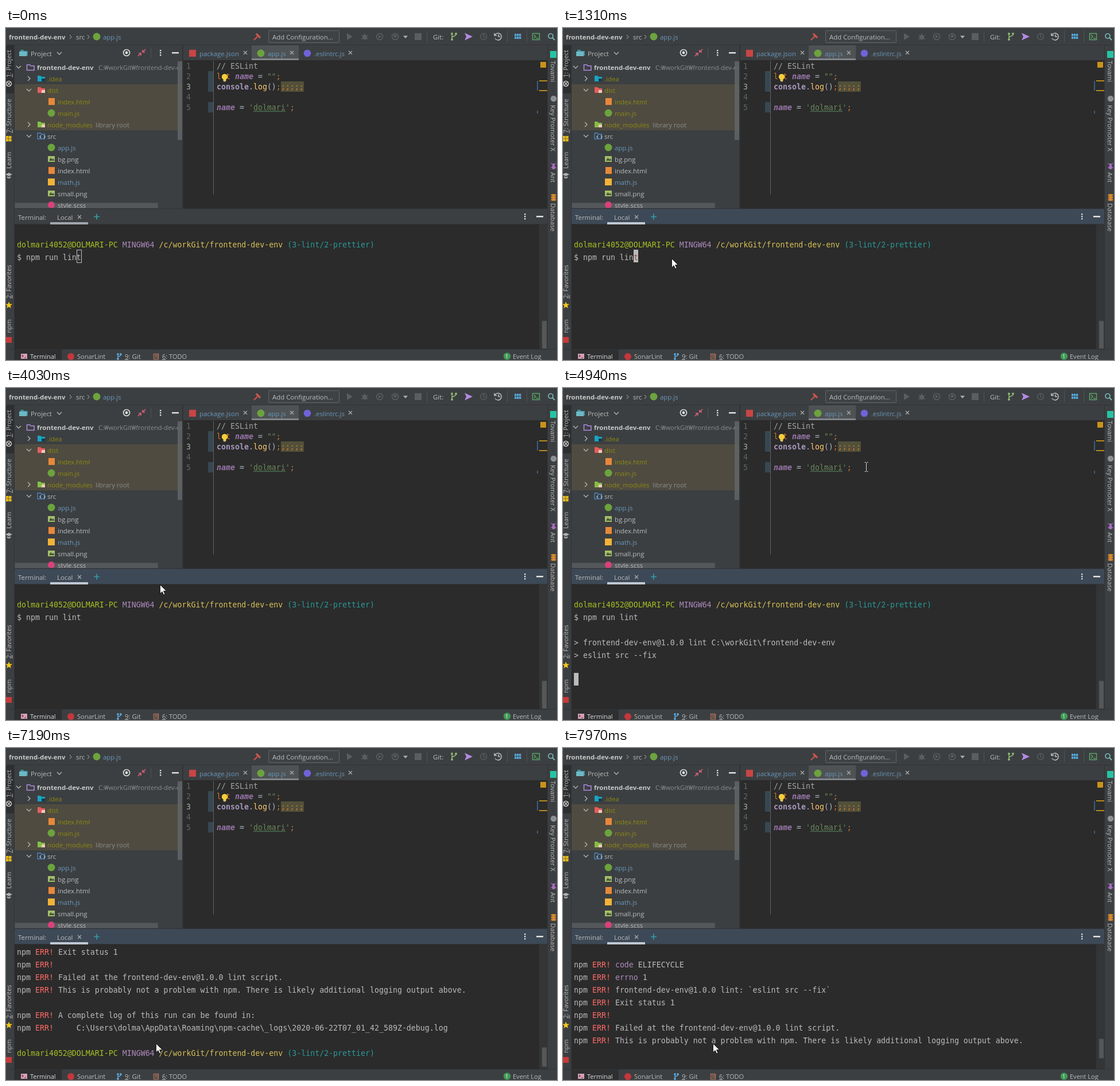
An HTML page for the animation above (8 s loop, 960 by 578 pixels).

```html
<!DOCTYPE html>
<html lang="en">
<head>
<meta charset="utf-8">
<title>Terminal lint run</title>
<style>
html, body { margin: 0; width: 100%; height: 100%; overflow: hidden; background: #3c3f41; }
svg { display: block; width: 100vw; height: 100vh; }
text { font: 11.4px "Open Sans", "Noto Sans", sans-serif; white-space: pre; }
text.mono { font: 13.289px "DejaVu Sans Mono", "Noto Sans Mono", monospace; font-variant-ligatures: none; }
.bold { font-weight: bold !important; }
.global { font-weight: bold; font-style: italic; }
</style>
</head>
<body>
<svg id="stage" viewBox="0 0 960 578"></svg>
<script>
const stage = document.getElementById('stage');
const USER = 'dolmari';
const TEXT = '#bbbbbb', BLUE = '#6897bb', OLIVE = '#8c8a12', GREY = '#8a8c8d';
const ICON = '#afb1b3', DIM = '#5b5e60', PANEL = '#3c3f41', DARK = '#2b2b2b', EDGE = '#313335';

let layer = stage;
function el(tag, attrs, content) {
  const node = document.createElementNS('http://www.w3.org/2000/svg', tag);
  for (const key in attrs) node.setAttribute(key, attrs[key]);
  if (content) node.textContent = content;
  return layer.appendChild(node);
}
function group(draw, attrs = {}) {
  const parent = layer;
  const node = layer = el('g', attrs);
  draw();
  layer = parent;
  return node;
}
const rect = (x, y, width, height, fill, more) => el('rect', { x, y, width, height, fill, ...more });
const dot = (cx, cy, r, fill, more) => el('circle', { cx, cy, r, fill, ...more });
const ring = (cx, cy, r, stroke, w = 1.3) => dot(cx, cy, r, 'none', { stroke, 'stroke-width': w });
const line = (d, stroke, w = 1.3) => el('path', { d, stroke, fill: 'none', 'stroke-width': w });
const shape = (d, fill) => el('path', { d, fill });
const label = (x, y, str, fill = TEXT, more) => el('text', { x, y, fill, ...more }, str);
const cross = (x, y) => line(`M${x - 3} ${y - 3}l6 6m0-6l-6 6`, ICON, 1.1);
const chevron = (x, y, open) =>
  line(open ? `M${x - 4} ${y - 2}l4 4 4-4` : `M${x - 2} ${y - 4}l4 4-4 4`, ICON, 1.4);
const dots = (x, y) => [-4, 0, 4].forEach(d => rect(x - 1, y + d - 1, 2.4, 2.4, '#dcdcdc'));
const folder = (x, y, fill) => shape(`M${x} ${y - 5}h5l2 2h6v8h-13z`, fill);

// Spans are [text, colour, class]
function mono(x, y, spans) {
  const node = el('text', { x, y, class: 'mono' });
  for (const [str, fill, cls] of spans) {
    const span = document.createElementNS(node.namespaceURI, 'tspan');
    span.textContent = str;
    span.setAttribute('fill', fill || TEXT);
    if (cls) span.setAttribute('class', cls);
    node.append(span);
  }
}

function drawToolbar() {
  rect(0, 0, 960, 578, PANEL);
  label(5, 19.5, 'frontend-dev-env', '#c8c8c8', { class: 'bold' });
  line('M111 12l3 3.500-3 3.500M142 12l3 3.500-3 3.500', ICON, 1);
  label(122, 19.5, 'src');
  dot(158, 15, 6.5, '#6ca33e');
  label(169, 19.5, 'app.js', BLUE);

  line('M432 21l8-8', '#c75450', 2.2);
  line('M436 10l7 7', '#c75450', 3.5);
  rect(457.5, 4.5, 123, 21, '#3f4244', { stroke: '#646769', rx: 2 });
  label(464, 20, 'Add Configuration...');
  shape('M594 9l10 6-10 6z', DIM);
  dot(625, 16, 4.3, DIM);
  line('M619 12l12 8m0-8l-12 8M625 9v3', DIM);
  ring(651, 15, 5.5, DIM, 1.6);
  shape('M649 12l5 3-5 3z', DIM);
  ring(678, 15, 5.5, DIM, 1.6);
  dot(678, 14, 2.5, DIM);
  shape('M692 13.500h8l-4 4.500z', ICON);
  rect(712, 9, 12, 12, DIM);
  [733, 873, 907].forEach(x => rect(x, 5, 1, 20, '#515456'));
  label(744, 19.5, 'Git:');
  line('M777 11v9M784 11c0 4-7 2-7 7', '#8fb573', 1.5);
  [[777, 10], [784, 10], [777, 20]].forEach(([x, y]) => dot(x, y, 2, '#8fb573'));
  shape('M799 8.500l14 6.500-14 6.500 3-6.500z', '#b389e0');
  ring(832, 15, 5.5, DIM);
  line('M832 11v4l3 2', DIM);
  line('M852 12a6 6 0 1 1 0 6M851 9v4h4M858 11v4h3', '#c5c5c5', 1.4);
  for (let i = 0; i < 6; i++) rect(886 + i % 3 * 4, 10 + (i / 3 | 0) * 5, 3.3, 4, '#55a6d9');
  rect(917.5, 9.5, 12, 11, 'none', { stroke: '#59a869', 'stroke-width': 1.4 });
  line('M920 12l3 3-3 3M924 18h4', '#59a869');
  ring(949, 14, 4, '#76b9bf', 1.7);
  line('M952 17l4 4', '#76b9bf', 2);
  rect(0, 29, 960, 1, EDGE);
}

function drawSideBars() {
  rect(0, 30, 14, 84, '#2d2f30');
  rect(14, 30, 1, 548, EDGE);
  rect(943, 30, 1, 530, EDGE);
  const left = [['1: Project', 86, 1], ['7: Structure', 183, 1], ['Learn', 245], ['2: Favorites', 471, 1], ['npm', 531]];
  for (const [str, y, hot] of left) {
    label(9, y, str, TEXT, { transform: `rotate(-90 9 ${y})`, style: 'font-size:11px' });
    if (hot) rect(10.5, y - 6, 1, 6, TEXT);
  }
  const right = [['Tovami', 57], ['Key Promoter X', 134], ['Ant', 251], ['Database', 305]];
  for (const [str, y] of right)
    label(949, y, str, TEXT, { transform: `rotate(90 949 ${y})`, style: 'font-size:11.2px' });

  ring(5, 97, 4.5, '#c5c5c5', 1.4);
  line('M2 94l6 6m0-6l-6 6', '#c5c5c5');
  [[0, 188], [5, 188], [0, 193], [5, 193]].forEach(([x, y]) => rect(x, y, 4.5, 4.5, '#e5b91a'));
  shape('M-1 255l6-3 6 3-6 3zM2 258l3 2 3-2v3l-3 1-3-1z', ICON);
  shape('M5 476.500l1.700 4 4.300.3-3.300 2.700 1.100 4.200-3.800-2.300-3.800 2.300 1.100-4.200-3.300-2.700 4.300-.3z', '#f4c51b');
  rect(0, 538, 10, 10, '#c93a3a');

  rect(948, 40, 11, 12, '#27c3a2');
  dot(954, 123, 5.2, '#8e9193');
  dot(954, 238, 2.3, '#b06bc9');
  dot(954, 243, 3, '#b06bc9');
  line('M949 235l10 9m0-9l-10 9', '#b06bc9', 1);
  [291, 295, 299].forEach(cy => el('ellipse', { cx: 954, cy, rx: 4.5, ry: 1.9, fill: '#e08a2e' }));
}

function drawProject() {
  folder(25, 43, '#3b93a5');
  rect(23, 41, 13, 8, '#6fb8c4');
  label(43, 48.5, 'Project');
  chevron(93, 44, true);
  ring(210, 43, 5.5, '#dedede', 1.7);
  dot(210, 43, 2.4, '#dedede');
  line('M230 49l5-5m-4 0h4v4M243 37l-5 5m0-4v4h4', '#e0637a', 1.5);
  rect(252, 34, 1, 18, '#515456');
  dots(269, 43);
  rect(289, 42, 12, 2.5, '#dedede');
  rect(15, 98, 292, 80, '#4f4b41');
  rect(15.5, 304.5, 249, 9, '#55585a', { stroke: '#494c4e' });

  const file = {
    node: (x, y) => dot(x, y, 6.5, '#6ca33e'),
    html: (x, y) => rect(x - 5, y - 6, 11, 12, '#e8883a'),
    js: (x, y) => rect(x - 6, y - 6, 12, 12, '#f0b23a'),
    sass: (x, y) => dot(x, y, 6, '#d9417b'),
    image(x, y) {
      rect(x - 6, y - 5, 12, 10, '#a3bf6a');
      shape(`M${x - 4} ${y + 3}l3-5 3 3 1.500-2 2 4z`, '#44523a');
    }
  };
  const rows = [
    ['.idea', '#1aa3c4', OLIVE, false], ['dist', '#e25d5f', OLIVE, true],
    ['index.html', 'html', OLIVE], ['main.js', 'node', OLIVE],
    ['node_modules', '#84bd45', OLIVE, false], ['src', '#4a86c5', TEXT, true],
    ['app.js', 'node', BLUE], ['bg.png', 'image', TEXT], ['index.html', 'html', TEXT],
    ['math.js', 'js', BLUE], ['small.png', 'image', TEXT], ['style.scss', 'sass', TEXT]
  ];
  group(() => {
    chevron(22, 68, true);
    line('M36.500 64h5l1.500 2h6v7.500h-12.500z', '#b18be0', 1.5);
    label(54, 72.5, 'frontend-dev-env', '#c8c8c8', { class: 'bold' });
    label(161, 72.5, 'C:₩workGit₩frontend-dev-env', GREY, { style: 'font-size:11.1px' });
    rows.forEach(([name, icon, color, open], i) => {
      const y = 88 + i * 20;
      if (file[icon]) {
        file[icon](79, y);
        label(90, y + 4.5, name, color);
        return;
      }
      chevron(40, y, open);
      if (name === 'src') {
        line(`M55 ${y - 5}h5l1.500 2h6v8h-12.500z`, icon);
        line(`M61 ${y - 1}l-2 2.500 2 2.500m5-5l2 2.500-2 2.500`, '#9cc4e8');
      } else {
        folder(55, y, icon);
        rect(62, y, 6, 5, name === '.idea' ? '#173d4d' : '#f0c9bd');
      }
      label(72, y + 4.5, name, color);
    });
    label(156, 172.5, 'library root', GREY);
  }, { 'clip-path': 'url(#tree)' });
  rect(299, 58, 8, 137, '#626567', { opacity: .85 });
  rect(307, 30, 2, 284, EDGE);
}

function drawEditor() {
  rect(428, 30, 82, 26, '#4e5254');
  rect(319, 38, 12, 12, '#c94545');
  label(337, 48.5, 'package.json', BLUE);
  cross(417, 43);
  dot(444, 44, 6.5, '#6ca33e');
  label(456, 48.5, 'app.js', BLUE);
  cross(498, 43);
  dot(525, 44, 6.3, '#6f63d8');
  label(537, 48.5, '.eslintrc.js', BLUE);
  cross(600, 43);
  rect(309, 56, 634, 258, DARK);
  rect(428, 53, 82, 3, '#80868b');
  rect(361, 57, 1, 233, '#606264');
  rect(352, 75, 9, 36, '#374752');
  rect(352, 129, 9, 18, '#374752');
  for (let n = 1; n < 6; n++) mono(314, 53 + n * 18, [[n, n === 3 ? '#a9a9a9' : '#606366']]);

  const orange = '#cc7832', green = '#6a8759', code = '#a9b7c6', purple = '#9876aa';
  rect(479, 93, 40, 18, '#52503a');
  mono(367, 71, [['// ESLint', '#a2a4a5']]);
  mono(367, 89, [['let ', orange], ['name', purple, 'global'], [' = ', code], ['""', green], [';', orange]]);
  mono(367, 107, [['console', '#a698bd', 'bold'], ['.', code], ['log', '#ffc66d'], ['()', code], [';;;;;;', orange]]);
  mono(367, 143, [['name', purple, 'global'], [' = ', code], [`'${USER}'`, green], [';', orange]]);
  line('M431 146' + 'l2-2 2 2'.repeat(14), '#659c6b', .9);
  dot(381, 85, 5, '#f5cf3a');
  rect(378.5, 89, 5, 3, '#f5cf3a');
  rect(379, 92, 4, 1.5, '#a5a5a5');

  rect(931, 59, 10, 10, '#c9921a');
  rect(929, 91, 14, 2, '#b88a1c');
  rect(929, 108, 14, 2, '#b88a1c');
  rect(925, 92, 2, 17, '#375f86');
  rect(925, 144, 2, 5, '#375f86');
  rect(15, 314, 928, 1, EDGE);
}

function drawBottomBar() {
  const small = { style: 'font-size:11px' };
  rect(0, 559, 960, 1, EDGE);
  rect(15, 560, 82, 18, '#2d2f30');
  rect(26, 567, 11, 9, '#d8a0b4');
  line('M28 569l2 2-2 2M32 574h3', '#5a2f40', 1.1);
  label(42, 576, 'Terminal', '#dddddd', small);
  dot(113, 572, 6, '#c4373c');
  label(124, 576, 'SonarLint', TEXT, small);
  line('M195 569v7M200 569c0 3-5 2-5 5', '#55a6d9', 1.5);
  [[195, 568], [200, 568], [195, 576]].forEach(([x, y]) => dot(x, y, 1.9, '#55a6d9'));
  label(207, 576, '9: Git');
  rect(207, 577, 6, 1, TEXT);
  rect(257.5, 567.5, 8, 9, 'none', { stroke: '#a8705a', 'stroke-width': 1.4 });
  line('M259 570h6M259 573h6', '#a8705a');
  label(272, 576, '6: TODO', TEXT, small);
  rect(272, 577, 6, 1, TEXT);
  dot(873, 571.5, 6.2, '#3f9a55');
  label(870, 575, '1', '#ffffff', { style: 'font-size:9px' });
  label(883, 576, 'Event Log', TEXT, small);
}

const prompt = [
  [`${USER}4052@${USER.toUpperCase()}-PC `, '#a8c023'], ['MINGW64 ', '#ae8abe'],
  ['/c/workGit/frontend-dev-env ', '#d6bf55'], ['(3-lint/2-prettier)', '#299999']
];
const err = (str = '', key = '') => [['npm '], ['ERR! ', '#ff6b68'], [key, '#ae8abe'], [str]];
const log = [
  [], prompt, [['$ npm run lint']], [],
  [['> frontend-dev-env@1.0.0 lint C:\\workGit\\frontend-dev-env']],
  [['> eslint src --fix']], [], [],
  err(' ELIFECYCLE', 'code'), err(' 1', 'errno'),
  err('frontend-dev-env@1.0.0 lint: `eslint src --fix`'), err('Exit status 1'), err(),
  err('Failed at the frontend-dev-env@1.0.0 lint script.'),
  err('This is probably not a problem with npm. There is likely additional logging output above.'),
  [], err('A complete log of this run can be found in:'),
  err(`    C:\\Users\\${USER.slice(0, 5)}\\AppData\\Roaming\\npm-cache\\_logs\\2020-06-22T07_01_42_589Z-debug.log`),
  [], prompt, [['$ ']]
];

// time, first visible line, printed lines, caret line, caret column, caret look
const screens = [
  [0, 0, 3, 2, 13, 'hollow'], [1310, 0, 3, 2, 13, 'solid'], [2240, 0, 3, 2, 13, ''],
  [2780, 0, 3, 2, 13, 'solid'], [3320, 0, 3, 2, 13, ''], [3480, 0, 3, 3, 0, 'solid'],
  [4020, 0, 3, 3, 0, ''], [4550, 0, 3, 3, 0, 'solid'], [4780, 0, 6, 7, 0, 'solid'],
  [5640, 7, 15, 15, 0, 'solid'], [5790, 12, 21, 20, 2, 'solid'], [6340, 12, 21, 20, 2, ''],
  [6880, 12, 21, 20, 2, 'solid'], [7190, 11, 21, 20, 2, ''], [7420, 10, 21, 20, 2, ''],
  [7660, 9, 21, 20, 2, ''], [7800, 8, 21, 20, 2, ''], [7970, 7, 21, 20, 2, '']
];
const FOCUS_AT = 1220, LOOP = 8000, ROWS = 9, ROW = 22, TOP = 342;

function drawScreen([, top, count, caretLine, caretCol, look]) {
  layer = terminal;
  terminal.replaceChildren();
  for (let row = 0; row < ROWS && top + row < count; row++)
    mono(19, TOP + 18 + row * ROW, log[top + row]);
  const x = 19 + caretCol * 8, y = TOP + (caretLine - top) * ROW;
  if (look === 'hollow') rect(x + .5, y + .5, 8, ROW, 'none', { stroke: '#c0c0c0' });
  if (look === 'solid') {
    rect(x, y, 8, ROW, TEXT);
    if (caretLine === 2) mono(x, y + 18, [['t', '#9a4a45']]);
  }
  const [thumbY, thumbH] = count < 7 ? [510, 48] : count < 21 ? [524, 34] : [525 - (12 - top) * 3.7, 33.5];
  rect(934, thumbY, 8, thumbH, '#555758', { stroke: '#484a4b', 'stroke-width': .6 });
  layer = stage;
}

// start, end, steps, from x, y, to x, y
const moves = [
  [530, 900, 6, 737, 546, 189, 401], [2930, 3020, 2, 189, 401, 173, 401],
  [3790, 4550, 11, 173, 401, 488, 205], [4630, 4940, 5, 488, 205, 528, 137],
  [6740, 7190, 7, 528, 137, 261, 514]
];
function pointerAt(t) {
  const move = moves.findLast(m => m[0] <= t);
  if (!move) return null;
  const [start, end, steps, x0, y0, x1, y1] = move;
  const step = Math.min(steps, 1 + Math.floor((t - start) / (end - start) * (steps - 1) + 1e-6));
  const p = step / steps, e = p * p * (3 - 2 * p);
  return [Math.round(x0 + (x1 - x0) * e), Math.round(y0 + (y1 - y0) * e)];
}

group(() => el('clipPath', { id: 'tree' }).append(rect(15, 58, 292, 255, '#fff')));
drawToolbar();
drawSideBars();
drawProject();
drawEditor();
drawBottomBar();
const header = rect(15, 315, 928, 26, PANEL);
rect(15, 341, 928, 1, EDGE);
label(21, 333.5, 'Terminal:');
label(89, 333.5, 'Local');
cross(128, 329);
const tabLine = rect(77, 338, 66, 4, '#888e94');
line('M153 328.500h10M158 323.500v10', '#2f9ea8', 1.7);
dots(904, 328);
rect(924, 327, 12, 2.5, '#e4e4e4');
rect(15, 342, 928, 217, DARK);
rect(929, 342, 14, 217, '#333536');
const terminal = group(() => {});
const arrow = group(() => el('path', {
  d: 'M.5.5v15.500l3.600-3.400 2.500 5.500 2.400-1.100-2.500-5.400h5z',
  fill: '#fff', stroke: '#111', 'stroke-width': .9
}));
const beam = group(() => line('M-2.500-7.500h2l1 1 1-1h2M.5-6.500v14M-2.500 8.500h2l1-1 1 1h2', '#d8d8d8', 1));

let shown;
function render(t) {
  const screen = screens.findLast(s => s[0] <= t);
  if (screen !== shown) drawScreen(shown = screen);
  const focused = t >= FOCUS_AT;
  header.setAttribute('fill', focused ? '#3d4956' : PANEL);
  tabLine.setAttribute('fill', focused ? '#c0c8d4' : '#a0a6ac');
  const pos = pointerAt(t), inEditor = pos && pos[1] < 314;
  arrow.style.display = pos && !inEditor ? '' : 'none';
  beam.style.display = inEditor ? '' : 'none';
  if (pos) (inEditor ? beam : arrow).setAttribute('transform', `translate(${pos})`);
}
const begin = performance.now();
function tick() {
  render((performance.now() - begin) % LOOP);
  requestAnimationFrame(tick);
}
tick();
</script>
</body>
</html>
```
